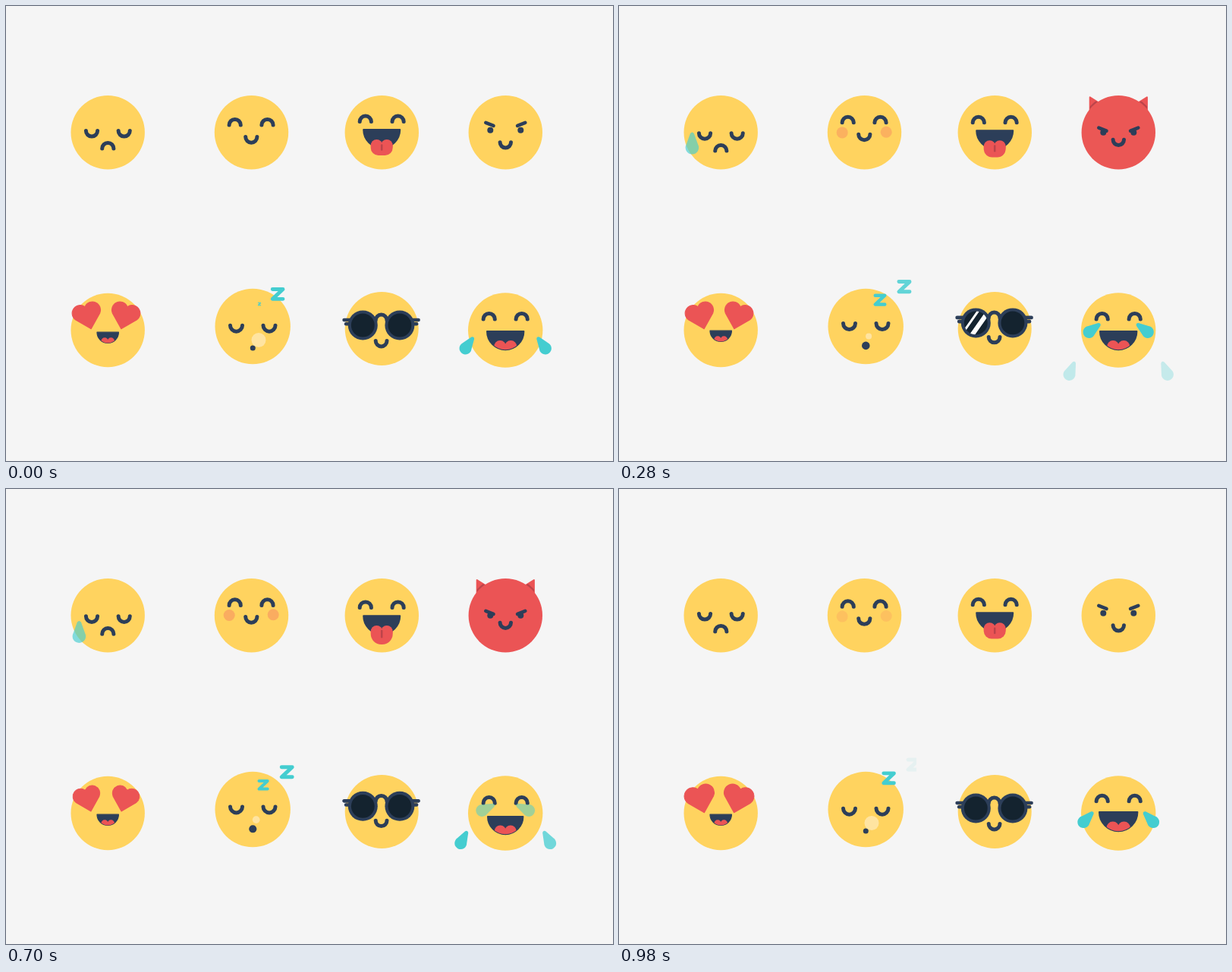
Write an HTML page with a canvas that moves like this. It is 800 by 600 pixels and loops after 1.05 s.

```html
<!DOCTYPE html>
<html lang="en">
<head>
<meta charset="utf-8">
<title>Emoji faces</title>
<style>
html, body { margin: 0; height: 100%; overflow: hidden; background: #f5f5f5 }
canvas { display: block }
</style>
</head>
<body>
<canvas id="stage" width="800" height="600"></canvas>
<script>
const c = document.getElementById('stage').getContext('2d');
const LOOP = 1050, STEP = 70, TAU = Math.PI * 2;
const YELLOW = '#ffd35f', DARK = '#2c3e59', RED = '#eb5455', TEAL = '#44cdd0', MAROON = '#bd444a';
const TEAR = new Path2D('M-2.3-17Q0-20 2.3-17L7-4A8 8 0 1 1-7-4Z');
const HEART = new Path2D('M0 18L-16.7 1A10.7 10.7 0 0 1 0-12.4A10.7 10.7 0 0 1 16.7 1Z');
const ZED = new Path2D('M-7-6.6H7L-7 6.6H7');

const clamp = v => Math.max(0, Math.min(1, v));
const ease = p => p * p * (3 - 2 * p);
const ramp = (t, a, b) => ease(clamp((t - a) / (b - a)));
// 1 at the peak time, 0 half a loop away
const swell = (t, peak) => ease((1 + Math.cos(TAU * (t - peak) / LOOP)) / 2);

function disc(x, y, r, color) {
  c.fillStyle = color;
  c.beginPath();
  c.arc(x, y, r, 0, TAU);
  c.fill();
}

function line(color, width, ...pts) {
  c.strokeStyle = color;
  c.lineWidth = width;
  c.beginPath();
  for (const [x, y] of pts) c.lineTo(x, y);
  c.stroke();
}

// half circle, open at the top (smile) or at the bottom (arch)
function bow(x, y, arch, r = 7.6) {
  c.strokeStyle = DARK;
  c.lineWidth = 5;
  c.beginPath();
  c.arc(x, y, r, 0, Math.PI, arch);
  c.stroke();
}

function at(x, y, angle, scale, alpha, draw) {
  c.save();
  c.translate(x, y);
  c.rotate(angle);
  c.scale(scale, scale);
  c.globalAlpha = alpha;
  draw();
  c.restore();
}

function tear(x, y, degrees, scale, alpha) {
  at(x, y, degrees * TAU / 360, scale, clamp(alpha), () => {
    c.fillStyle = TEAL;
    c.fill(TEAR);
  });
}

function mouth(x, y, w, tongue) {
  at(x, y, 0, w / 25, 1, () => {
    c.beginPath();
    c.moveTo(24, 1);
    c.arc(0, 1, 24, 0, Math.PI);
    c.closePath();
    c.fillStyle = c.strokeStyle = DARK;
    c.lineWidth = 2;
    c.fill();
    c.stroke();
    if (!tongue) return;
    c.clip();
    disc(-7, 21, 8, RED);
    disc(7, 21, 8, RED);
  });
}

function sad(t) {
  const k = ramp(t, 70, 310) - ramp(t, 690, 920);
  disc(134.2, 166.7, 48.7, YELLOW);
  bow(113, 164.5 + 3.3 * k, false);
  bow(155.7, 164.5 + 3.3 * k, false);
  bow(134.3, 188 + 3.2 * k, true);
  const rise = 21 * (1 - clamp((t - 70) / 400)) ** 1.4;
  tear(96.4, 194.3 - rise, 0, 1.1, Math.min((t - 98) / 280, (830 - t) / 200));
}

function happy(t) {
  const k = ramp(t, 110, 330) - ramp(t, 880, 1070);
  disc(323.5, 166.7, 48.7, YELLOW);
  c.globalAlpha = k;
  disc(294.2, 169.5 - 3 * k, 7.5, '#faac60');
  disc(352.2, 169 - 3.2 * k, 7.5, '#faac60');
  c.globalAlpha = 1;
  bow(301.7, 157 - 3.6 * k, true);
  bow(344.5, 157 - 3.6 * k, true);
  bow(323.3, 172.6 - 4 * k, false);
}

function cheeky(t) {
  const k = swell(t, 590), top = 176 + 4.2 * k;
  disc(495.3, 166.7, 48.7, YELLOW);
  bow(473.8, 152.6 + 4 * k, true);
  bow(516.6, 152.6 + 4 * k, true);
  mouth(495.2, 162 + 4.4 * k, 25);
  disc(488.5, top + 7.8, 7.8, RED);
  disc(501.9, top + 7.8, 7.8, RED);
  c.beginPath();
  c.roundRect(480.7, top + 7.6, 29, 13.4 + 4 * k, [0, 0, 10 + 4 * k, 10 + 4 * k]);
  c.fill();
  line(MAROON, 2.5, [495.2, 183.5 + 3.5 * k], [495.2, 189.5 + 6 * k]);
}

function devil(t) {
  const k = ramp(t, 70, 300) - ramp(t, 730, 950), x = 658.3, y = 166.7;
  const mix = (a, b) => a + (b - a) * k;
  if (k > 0) for (const side of [-1, 1]) {
    c.save();
    c.translate(x, 18 * (1 - k));
    c.scale(side, 1);
    c.beginPath();
    c.moveTo(37.6, 120);
    c.lineTo(37.6, 148);
    c.lineTo(20, 131);
    c.closePath();
    c.fillStyle = c.strokeStyle = RED;
    c.lineWidth = 2;
    c.fill();
    c.stroke();
    c.clip();
    disc(0, y - 18 * (1 - k), 51, MAROON);
    c.restore();
  }
  disc(x, y, 48.7, `rgb(${mix(255, 235)},${mix(211, 84)},${mix(95, 85)})`);
  for (const side of [-1, 1]) {
    disc(x + side * 20, 163.8 + 3 * k, 4, DARK);
    line(DARK, 4.6, [x + side * 26, 153.8 + 7 * k], [x + side * 15.8, 157.8 + 7 * k]);
  }
  bow(x, 179.8 - 3.6 * k, false, 7.2);
}

function smitten(t) {
  const a = TAU * t / 560, size = 1 - 0.05 * Math.sin(a);
  disc(134.2, 427.5, 48.7, YELLOW);
  for (const side of [-1, 1]) {
    at(132 + side * 24.6, 408.5, side * 0.27, size, 1, () => {
      c.fillStyle = c.strokeStyle = RED;
      c.lineWidth = 1;
      c.fill(HEART);
      c.stroke(HEART);
    });
  }
  mouth(134.2, 428.6 + Math.cos(a), 14.8, true);
}

function sleepy(t) {
  const k = swell(t, 475);
  disc(325.2, 422.5, 49.7, YELLOW);
  bow(303.5, 421.2 - 3.5 * k, false, 8);
  bow(347, 421.2 - 3.5 * k, false, 8);
  disc(325.3, 451 - 4 * k, 3.5 + 2.3 * k, DARK);
  disc(333 - 5 * k, 440.5 - 6.5 * k, 9.5 - 7 * k, 'rgba(255,233,178,.8)');
  c.save();
  c.beginPath();
  c.rect(0, 300, 392, 200);
  c.clip();
  for (const age of [t % 510, t % 510 + 510]) {
    const lag = Math.exp(-age / 110);
    const x = 325.4 + 0.064 * age + 8.6 * lag, y = 397.8 - 0.035 * age - 4.8 * lag;
    at(x, y, 0, 1 - 0.77 * Math.exp(-age / 140), clamp((1000 - age) / 250), () => {
      c.strokeStyle = TEAL;
      c.lineWidth = 5;
      c.stroke(ZED);
    });
  }
  c.restore();
}

function cool(t) {
  const k = swell(t, 475), x = 494.6, y = 421 - 4 * k;
  const glint = 475 + 0.364 * (t - 280);
  const streak = (at, width) => line('#fff', width, [at + 14, y - 18], [at - 14, y + 22]);
  disc(495.2, 425.5, 48.5, YELLOW);
  for (const side of [-1, 1]) {
    const lens = x + side * 24.3;
    line(DARK, 4.6, [x + side * 49, y - 7], [x + side * 36, y - 7]);
    line(DARK, 4.6, [x + side * 46.5, y - 1.8], [x + side * 38, y - 1.8]);
    disc(lens, y, 19.5, DARK);
    disc(lens, y, 15.4, '#14232f');
    c.save();
    c.beginPath();
    c.arc(lens, y, 15.4, 0, TAU);
    c.clip();
    streak(glint, 6);
    if (side < 0) streak(glint - 14, 3);
    c.restore();
  }
  bow(x, y - 6.5, true, 7.4);
  bow(x, 441.5 - 6.5 * k, false, 7.4);
}

function laughing(t) {
  const wave = Math.sin(TAU * t / 560), x = 658.2;
  disc(x, 427.5, 49.2, YELLOW);
  bow(636.7, 413 + 1.2 * wave, true);
  bow(679.7, 413 + 1.2 * wave, true);
  mouth(x, 428 + 3 * wave, 25.2 - wave, true);
  const n0 = t % 560 / 140 - 1;
  for (const n of [n0, n0 + 4]) {
    const dx = 31 + 8 * n - 0.25 * n * n, y = 424 + 4.4 * n + 1.6 * n * n;
    const tilt = 65 - 12 * n + 0.7 * n * n, fadeIn = (n + 1) / 2;
    tear(x - dx, y, tilt, 1, Math.min(fadeIn, (5.43 - n) * 0.7));
    tear(x + dx, y, -tilt, 1, Math.min(fadeIn, (5.57 - n) * 0.48));
  }
}

const faces = [sad, happy, cheeky, devil, smitten, sleepy, cool, laughing];
c.lineCap = c.lineJoin = 'round';

function draw() {
  const t = Math.floor(performance.now() % LOOP / STEP) * STEP;
  c.fillStyle = '#f5f5f5';
  c.fillRect(0, 0, 800, 600);
  for (const face of faces) face(t);
  requestAnimationFrame(draw);
}
draw();
</script>
</body>
</html>
```
